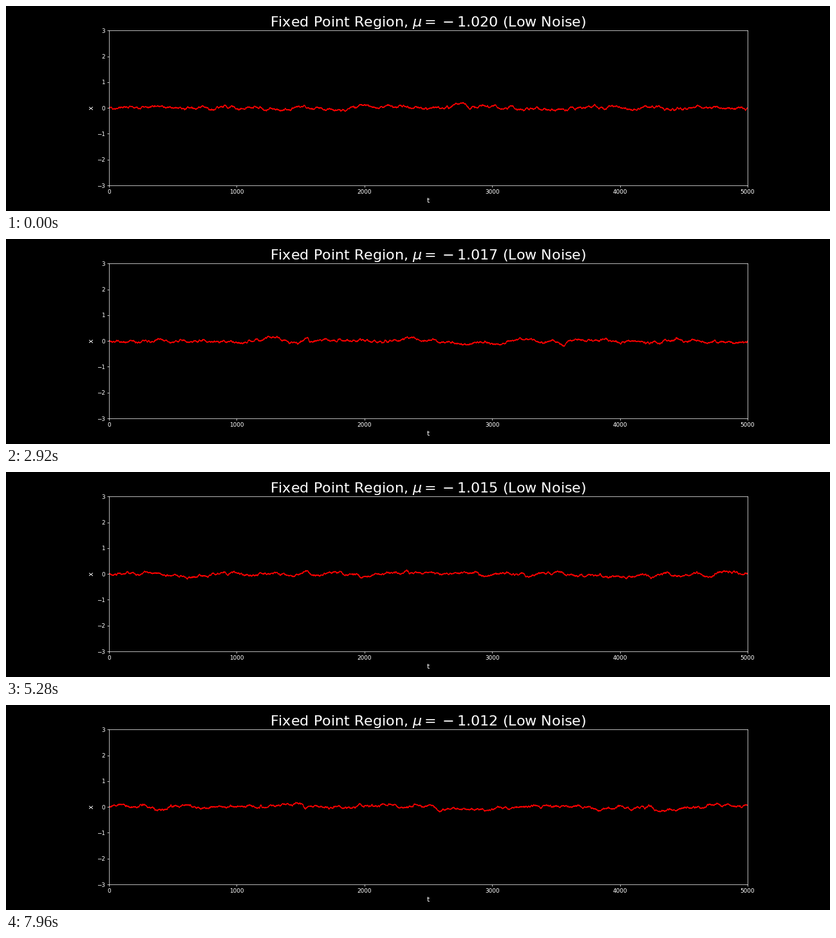
Write a matplotlib script that moves like this. It is 1280 px wide and 320 px high and loops after 8000 ms.

```python
import numpy as np
import matplotlib.pyplot as plt
from matplotlib.animation import FuncAnimation

FRAMES = 200
INTERVAL = 40       # ms
STEPS = 5000
DT = 0.01
SIGMA = 0.1         # noise strength
MU_START = -1.02
MU_STEP = 4e-5      # drift of the control parameter per frame


def simulate(mu, rng):
    """Euler-Maruyama runs of dx = (mu x - x^3) dt + sigma dW, one row per mu."""
    x = np.zeros((len(mu), STEPS))
    kicks = SIGMA * np.sqrt(DT) * rng.standard_normal(x.shape)
    for k in range(1, STEPS):
        prev = x[:, k - 1]
        x[:, k] = prev + (mu * prev - prev**3) * DT + kicks[:, k]
    return x


def title_text(mu):
    # the empty group keeps the minus sign spaced like a binary operator
    return rf"Fixed Point Region, $\mu = {{}}-{abs(mu):.3f}$ (Low Noise)"


mus = MU_START + MU_STEP * np.arange(FRAMES)
paths = simulate(mus, np.random.default_rng(11))

plt.style.use("dark_background")
plt.rcParams["font.family"] = "DejaVu Sans"

fig, ax = plt.subplots(figsize=(20, 5), dpi=64)
fig.subplots_adjust(left=0.125, right=0.9, bottom=0.125, top=0.88)
ax.set_xlim(0, STEPS)
ax.set_ylim(-3, 3)
ax.set_xticks(range(0, STEPS + 1, 1000))
ax.set_yticks(range(-3, 4))
ax.set_xlabel("t", fontsize=12)
ax.set_ylabel("x", fontsize=12)
title = ax.set_title(title_text(mus[0]), fontsize=25)
line, = ax.plot(np.arange(STEPS), paths[0], color="red", lw=1.5)


def update(i):
    line.set_ydata(paths[i])
    title.set_text(title_text(mus[i]))
    return line, title


anim = FuncAnimation(fig, update, frames=FRAMES, interval=INTERVAL,
                     repeat=True, repeat_delay=0)
plt.show()
```
